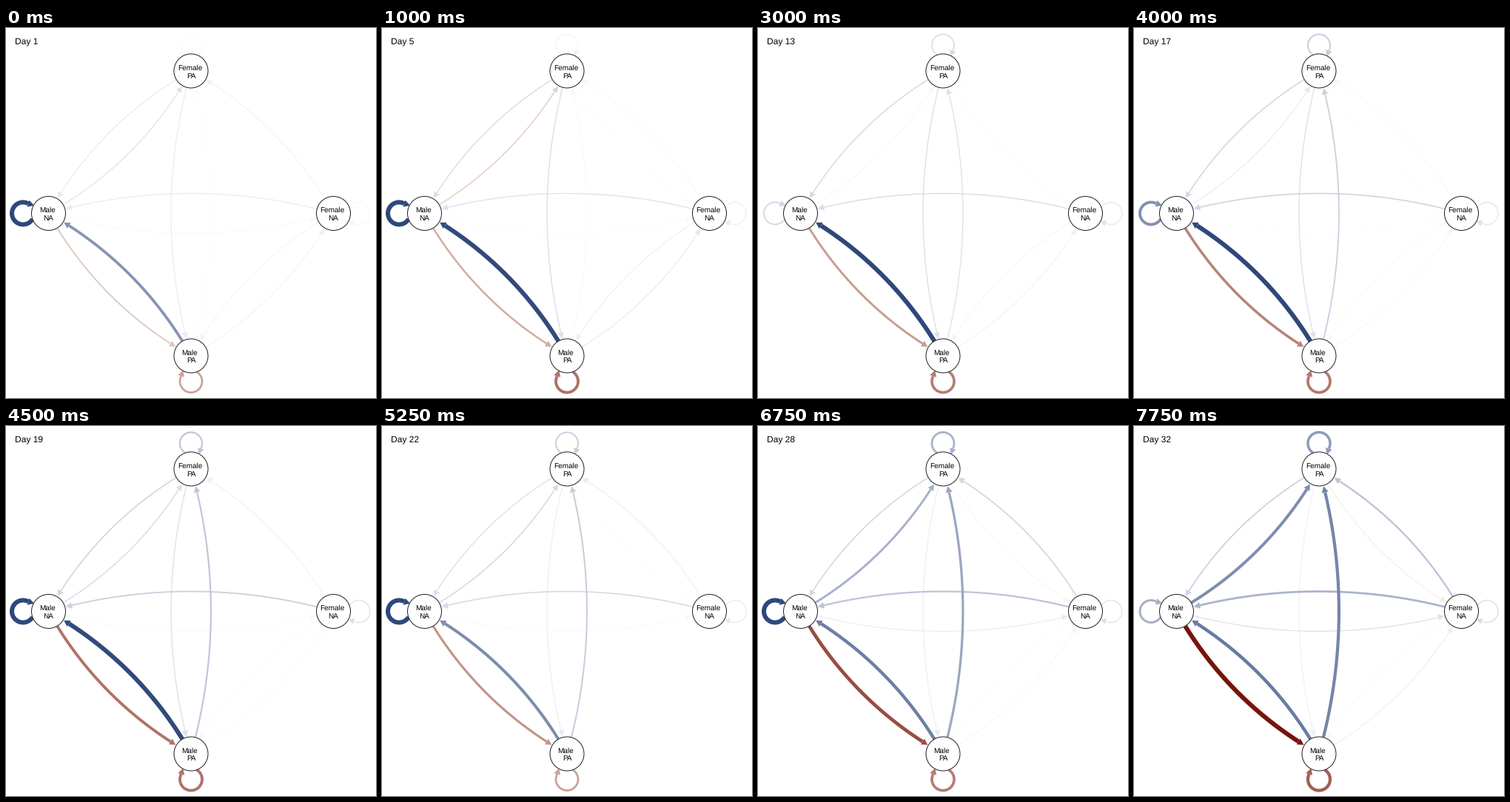
A matplotlib script for the animation above (8000 ms loop, 500 px wide and 500 px high).

```python
import numpy as np
import matplotlib.pyplot as plt
from matplotlib.animation import FuncAnimation
from matplotlib.patches import Circle, Polygon

SIZE, DAYS, STEP = 500, 32, 250
CENTER = np.array([250, 250.5])
SPREAD = 192.5                      # middle of the stage to each node
NODE_R, LOOP_R, LOOP_DIST, HEAD = 23, 15, 34.5, 8.5
PT = 72 / 100                       # points per pixel
DIRECTION = {"FP": (0, -1), "MN": (-1, 0), "FN": (1, 0), "MP": (0, 1)}
NODES = {key: CENTER + SPREAD * np.array(d) for key, d in DIRECTION.items()}

# Signed edge strength at the start, middle and end; a parabola joins them
TRENDS = {
    "FP FP": (.03, .24, .75),
    "FP MN": (.16, .19, .31),
    "FP MP": (.15, .14, .10),
    "FP FN": (0, .01, -.10),
    "MN FP": (-.22, .07, .86),
    "MN MP": (-.40, -.52, -1.39),
    "MN FN": (.05, .01, .18),
    "MP MP": (-.69, -.58, -.95),
    "MP MN": (1, 1, 1),
    "MP FP": (.03, .22, .92),
    "MP FN": (-.10, -.04, .10),
    "FN FN": (.07, .12, .21),
    "FN MN": (.15, .20, .56),
    "FN FP": (.10, .03, .44),
    "FN MP": (.08, .03, -.04),
}

STOPS = [0, .1, .4, 1]
BLUE = [(255, 255, 255), (230, 230, 238), (171, 181, 205), (46, 72, 122)]
RED = [(255, 255, 255), (240, 229, 223), (204, 163, 151), (118, 20, 12)]


def parabola(t, start, mid, end):
    return start * (1 - t) * (1 - 2 * t) + mid * 4 * t * (1 - t) + end * t * (2 * t - 1)


def swing(day):
    """The strongest loop ebbs and returns over 25 days."""
    wave = (1 + np.cos(2 * np.pi * (day - 24.5) / 25)) / 2
    return .2 + 1.6 * wave ** 1.3


def strengths(day):
    t = (day - 1) / (DAYS - 1)
    now = {name: parabola(t, *trend) for name, trend in TRENDS.items()}
    now["MN MN"] = swing(day)
    top = max(map(abs, now.values()))
    return {name: w / top for name, w in now.items()}


def shade(w):
    ramp = np.array(RED if w < 0 else BLUE) / 255
    return [np.interp(abs(w), STOPS, channel) for channel in ramp.T]


def arc(a, b):
    """Points of an arc bulging to the right of a -> b, and its arrow tip."""
    chord = b - a
    side = np.array([-chord[1], chord[0]])
    half = 2 * np.arctan(.14)
    t = np.linspace(-half, half, 600)
    along = .5 + np.sin(t) / (2 * np.sin(half))
    bulge = (np.cos(t) - np.cos(half)) / (2 * np.sin(half))
    pts = a + np.outer(along, chord) + np.outer(bulge, side)
    from_a, from_b = (np.hypot(*(pts - end).T) for end in (a, b))
    tip = pts[from_b >= NODE_R + .5][-1]
    return pts[(from_a >= NODE_R) & (from_b >= NODE_R + .5 + HEAD)], tip


def loop(key):
    """Clockwise self-loop on the outer side of a node, and its arrow tip."""
    out = np.array(DIRECTION[key])
    right = np.array([-out[1], out[0]])
    t = np.radians(np.linspace(31, 298, 120))
    line = (NODES[key] - np.outer(LOOP_R * np.sin(t), right)
            + np.outer(LOOP_DIST - LOOP_R * np.cos(t), out))
    return line, line[-1] - HEAD * (.3 * right + .95 * out)


plt.rcParams.update({"font.family": "Liberation Sans", "text.hinting": "none"})
fig = plt.figure(figsize=(5, 5), dpi=100, facecolor="white")
ax = fig.add_axes([0, 0, 1, 1])
ax.set(xlim=(0, SIZE), ylim=(SIZE, 0))
ax.axis("off")

edges = {}
for name in [*TRENDS, "MN MN"]:
    a, b = name.split()
    path, tip = loop(a) if a == b else arc(NODES[a], NODES[b])
    line, = ax.plot(*path.T, solid_capstyle="butt")
    head = ax.add_patch(Polygon([tip] * 3, lw=0))
    edges[name] = line, head, path[-1], tip

for key, (x, y) in NODES.items():
    ax.add_patch(Circle((x, y), NODE_R, fc="white", ec="#222222", lw=PT, zorder=5))
    sex = "Female" if key[0] == "F" else "Male"
    affect = key[1] + "A"
    for label, dx, dy in ((sex, -1.5, -1.5), (affect, 0, 9.5)):
        ax.text(x + dx, y + dy, label, size=10 * PT, ha="center", va="baseline", zorder=6)
day_label = ax.text(12.5, 22, "", size=12 * PT, va="baseline")


def update(i):
    for name, w in strengths(i + 1).items():
        line, head, base, tip = edges[name]
        color, size = shade(w), abs(w)
        line.set(color=color, linewidth=(.6 + 5.4 * size) * PT, zorder=2 + size)
        way = (tip - base) / np.hypot(*(tip - base))
        side = np.array([-way[1], way[0]]) * (4.3 + .4 * size)
        head.set_xy([base + side, tip, base - side])
        head.set(facecolor=color, zorder=2 + size)
    day_label.set_text(f"Day {i + 1}")
    return []


anim = FuncAnimation(fig, update, frames=DAYS, interval=STEP, repeat=True, repeat_delay=0)
plt.show()
```
